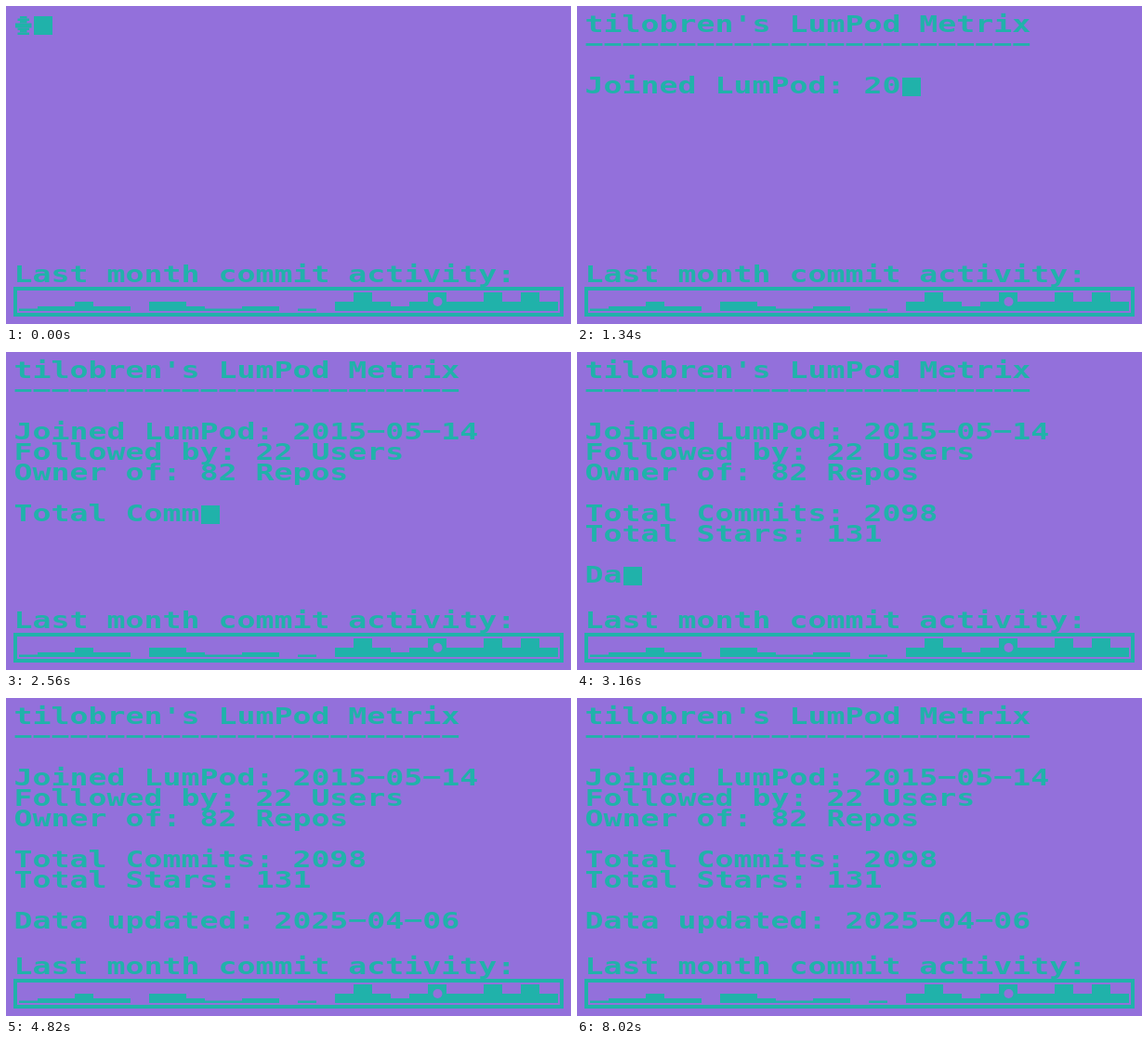
An HTML page that plays this animation: 608 by 342 pixels, repeating every 8.42 s.

```html
<!DOCTYPE html>
<html lang="en">
<head>
<meta charset="utf-8">
<title>Terminal stats</title>
<style>
  html, body { margin: 0; width: 100%; height: 100%; overflow: hidden; background: #9370db; }
  svg { display: block; width: 100%; height: 100%; fill: #20b2aa; }
  text { font: bold 24px "DejaVu Sans Mono", "Liberation Mono", monospace; white-space: pre; }
  tspan { baseline-shift: 1px; }
</style>
</head>
<body>
<svg id="stage" viewBox="0 0 608 342">
  <g id="lines"></g>
  <g id="club"></g>
  <rect id="cursor" width="20" height="20"/>
  <rect x="10" y="304" width="588" height="28" fill="none" stroke="#20b2aa" stroke-width="4"/>
  <g id="bars"></g>
  <circle cx="464.5" cy="318" r="5" fill="#9370db"/>
</svg>
<script>
const LOOP = 8420, STEP = 20, BLINK = 400;
const CELL = 20, LEFT = 10, TOP = 11, LEADING = 22, DOT = CELL / 8;
const WIDE = 1.384; // expanded letterforms

const rows = [
  "tilobren's LumPod Metrix",
  "-".repeat(24),
  "",
  "Joined LumPod: 2015-05-14",
  "Followed by: 22 Users",
  "Owner of: 82 Repos",
  "",
  "Total Commits: 2098",
  "Total Stars: 131",
  "",
  "Data updated: 2025-04-06"
];
const script = rows.join("\n");
const typedAt = (script.length - 1) * STEP;

const byId = id => document.getElementById(id);
const club = byId("club"), cursor = byId("cursor");

function add(parent, tag, attrs) {
  const el = document.createElementNS("http://www.w3.org/2000/svg", tag);
  for (const key in attrs) el.setAttribute(key, attrs[key]);
  return parent.appendChild(el);
}

const addLine = baseline => add(byId("lines"), "text", {
  transform: `translate(${LEFT - 1.5} ${baseline}) scale(${WIDE} 1)`
});

const lines = rows.map((_, i) => addLine(TOP + i * LEADING + 17));
addLine(297).textContent = "Last month commit activity:";

// Club symbol: the width in dots of each row, centred
[..."35377535"].forEach((dots, i) => add(club, "rect", {
  x: LEFT + (7 - dots) / 2 * DOT, y: TOP + i * DOT, width: dots * DOT, height: DOT
}));

// One digit per day: each level doubles the bar height
[..."12232203321122010343234334343"].forEach((level, day) => {
  const height = level > 0 ? DOT * 2 ** (level - 1) : 0;
  add(byId("bars"), "rect", { x: 14 + day * CELL, y: 328 - height, width: CELL, height });
});

// Wide, raised dashes that fill most of a cell
const wideDash = s => s.replace(/-+/g, run => `<tspan>${"\u2212".repeat(run.length)}</tspan>`);

function draw(t) {
  const count = Math.min(Math.floor(t / STEP) + 1, script.length);
  const typed = script.slice(0, count).split("\n");
  const first = count === 1;
  lines.forEach((line, i) => {
    line.innerHTML = first ? "" : wideDash(typed[i] || "");
  });
  club.style.display = first ? "" : "none";

  const row = typed.length - 1;
  cursor.setAttribute("x", LEFT + typed[row].length * CELL);
  cursor.setAttribute("y", TOP + row * LEADING);
  const phase = Math.floor((t - typedAt - STEP) / BLINK);
  cursor.style.display = phase > 0 && phase % 2 ? "none" : "";
}

const start = performance.now();
function tick() {
  draw((performance.now() - start) % LOOP);
  requestAnimationFrame(tick);
}
tick();
</script>
</body>
</html>
```
